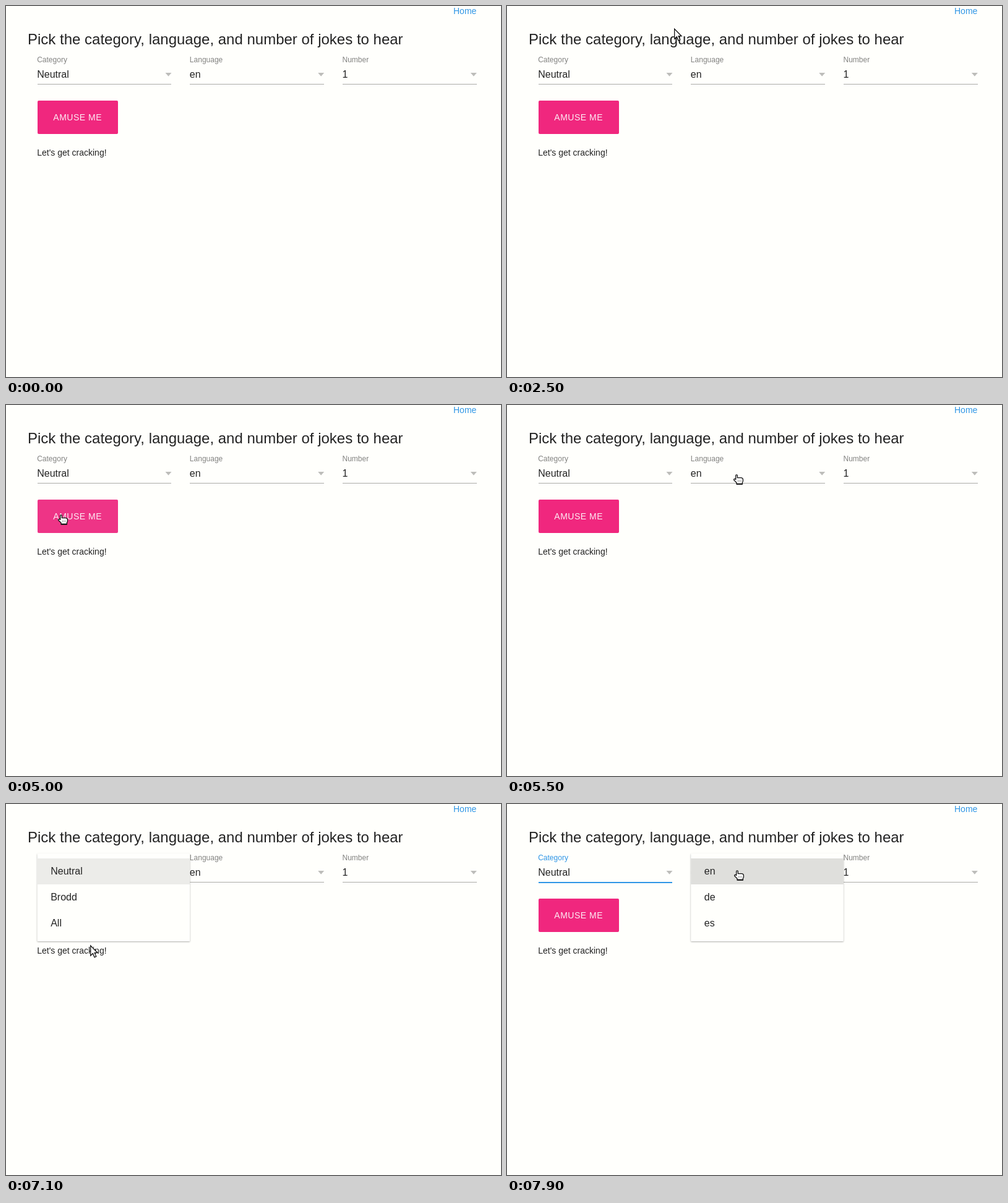
Recreate the animation shown at these times as an HTML page. Size 800 px wide and 600 px high, loop 8000 ms.

```html
<!DOCTYPE html>
<html lang="en">
<head>
<meta charset="utf-8">
<title>Joke picker</title>
<style>
  html, body { margin: 0; width: 100%; height: 100%; overflow: hidden; background: #fffffc; }
  svg { display: block; width: 800px; height: 600px; font-family: "Liberation Sans", Arial, sans-serif; }
  .box { filter: drop-shadow(0 1px 1.2px rgba(0, 0, 0, .32)); }
</style>
</head>
<body>
<svg id="stage" viewBox="0 0 800 600">
  <rect width="800" height="600" fill="#fffffc"/>
</svg>
<script>
const NS = 'http://www.w3.org/2000/svg';
const stage = document.getElementById('stage');
const LOOP = 8000, TICK = 100;
const INK = '#232323', GREY = '#838381', BLUE = '#2f96e6', LINE = '#ababa8';
const LEFT = 50.5, COLUMN = 246.67, FIELD = 216.67, ROW = 42;
const CATEGORY = { open: 5800, close: 7400 };
const LANGUAGE = { open: 7700, close: LOOP };

function set(node, attrs) {
  for (const key in attrs) node.setAttribute(key, attrs[key]);
}
function el(parent, tag, attrs, text) {
  const node = document.createElementNS(NS, tag);
  set(node, attrs);
  if (text) node.textContent = text;
  parent.appendChild(node);
  return node;
}
function label(parent, x, y, size, text, fill = INK) {
  return el(parent, 'text', { x, y, 'font-size': size, fill }, text);
}
const show = (node, on) => set(node, { visibility: on ? 'visible' : 'hidden' });
const columnX = i => LEFT + COLUMN * i;
const clamp = v => Math.max(0, Math.min(1, v));
const easeOut = (v, power) => 1 - Math.pow(1 - clamp(v), power);

function makeField(column, name, value) {
  const x = columnX(column), left = Math.round(x);
  const title = label(stage, x - .3, 91, 12, name, GREY);
  label(stage, x - .3, 116, 16, value);
  el(stage, 'path', { d: `M${x + 207} 108h10l-5 5.8z`, fill: '#bdbdba' });
  const line = el(stage, 'rect', { x: left, y: 126, width: Math.round(x + FIELD) - left });
  return focused => {
    set(title, { fill: focused ? BLUE : GREY });
    set(line, { fill: focused ? BLUE : LINE, height: focused ? 2 : 1 });
  };
}

function makeMenu(column, times, items) {
  const x = columnX(column);
  const group = el(stage, 'g', {});
  el(group, 'rect', { class: 'box', x, y: 80, width: COLUMN, height: 142, rx: 1, fill: '#fffffc' });
  const rows = items.map((text, i) => {
    const row = el(group, 'rect', { x, y: 88 + ROW * i, width: COLUMN, height: ROW });
    label(group, x + 21.7, 114 + ROW * i, 16, text);
    return row;
  });
  const rowFill = (i, hovered) => i === 0
    ? (hovered ? '#dfdfdc' : '#ecece9')
    : (hovered ? '#eeeeeb' : 'none');

  return (t, hover) => {
    const shown = t < times.close
      ? easeOut((t - times.open) / 150, 3)
      : 1 - easeOut((t - times.close) / 250, 3);
    show(group, shown > 0);
    set(group, {
      opacity: shown,
      transform: `translate(${x} 80) scale(${.3 + .7 * shown}) translate(${-x} -80)`
    });
    rows.forEach((row, i) => set(row, { fill: rowFill(i, hover === i) }));
  };
}

label(stage, 723, 13, 14, 'Home', BLUE);
label(stage, 35, 62, 24, 'Pick the category, language, and number of jokes to hear');
const focusCategory = makeField(0, 'Category', 'Neutral');
const focusLanguage = makeField(1, 'Language', 'en');
const focusNumber = makeField(2, 'Number', '1');
const button = el(stage, 'rect', { x: 51, y: 153, width: 130, height: 54, rx: 2 });
set(label(stage, 76.3, 185, 14, 'AMUSE ME', '#fdeef5'), { 'letter-spacing': .5 });
label(stage, LEFT - .3, 242, 14, "Let's get cracking!");
const drawCategory = makeMenu(0, CATEGORY, ['Neutral', 'Brodd', 'All']);
const drawLanguage = makeMenu(1, LANGUAGE, ['en', 'de', 'es']);

// Both cursors have their tip at the local origin.
const arrow = el(stage, 'path', {
  d: 'M.7 1V17.2L4.4 13.7L7 19.8L9.8 18.6L7.2 12.7H12z',
  fill: '#fff', stroke: '#111', 'stroke-width': 1.3
});
const hand = el(stage, 'g', {});
el(hand, 'path', {
  d: 'M-1.3 8.5V2.2Q-1.3.8 0 .8T1.3 2.2V5.6H7.6Q10.4 6 10.4 8.6V11.5L9.4 13V16H0V13.5L-4.2 9.6Q-4.8 7.6-3 7.3z',
  fill: '#fff', stroke: '#111', 'stroke-width': 1.3, 'stroke-linejoin': 'round'
});
el(hand, 'path', { d: 'M0 15.6H9.6', stroke: '#111', 'stroke-width': 1.8 });
el(hand, 'path', { d: 'M2.5 9.6v2.6M4.8 9.6v2.6M7.1 9.6v2.6', stroke: '#777', 'stroke-width': .8 });

// The tip follows one bent stroke per leg, slowing down towards its end.
const legs = [
  { show: 800, go: 800, arrive: 1200, hide: 1400, tick: 200, path: [[490, 201], [500, 319], [389, 268]] },
  { show: 2000, go: 2000, arrive: 2500, hide: 2600, path: [[290, 215], [-68, 370], [270, 36]] },
  { show: 4400, go: 4500, arrive: 5000, hide: 5000, path: [[524, 172], [300, 370], [89, 177]] },
  { show: 5000, go: 5000, arrive: 5400, hide: 5400, path: [[89, 177], [240, 75], [451, 104]] },
  { show: 5400, go: 5400, arrive: 6100, hide: 6600, path: [[451, 104], [300, 125], [150, 96]] },
  { show: 6600, go: 6600, arrive: 7100, hide: 7200, path: [[150, 96], [165, 160], [136, 228]] },
  { show: 7200, go: 7300, arrive: 7900, hide: LOOP, path: [[290, 210], [365, -30], [372, 107]] }
];

function tipAt(t) {
  const leg = legs.find(l => t >= l.show && t < l.hide);
  if (!leg) return null;
  const tick = leg.tick || TICK;
  const u = easeOut((Math.floor(t / tick) * tick - leg.go) / (leg.arrive - leg.go), 2);
  const [a, b, c] = leg.path;
  return [0, 1].map(k => Math.round((1 - u) ** 2 * a[k] + 2 * u * (1 - u) * b[k] + u * u * c[k]));
}

const inside = (tip, x, y, w, h) =>
  !!tip && tip[0] >= x && tip[0] < x + w && tip[1] >= y && tip[1] < y + h;

function draw(time) {
  const t = Math.floor(time / TICK) * TICK;
  const tip = tipAt(t);
  const isOpen = menu => t >= menu.open && t < menu.close;
  const openColumn = isOpen(CATEGORY) ? 0 : isOpen(LANGUAGE) ? 1 : -1;

  const onRows = openColumn >= 0 && inside(tip, columnX(openColumn), 88, COLUMN, 3 * ROW);
  const onButton = openColumn < 0 && inside(tip, 51, 153, 130, 54);
  const onField = openColumn < 0 && [0, 1, 2].some(i => inside(tip, columnX(i), 80, FIELD, 46));
  const pointing = onRows || onButton || onField;
  const hover = onRows ? Math.floor((tip[1] - 88) / ROW) : -1;

  set(button, { fill: onButton ? '#ee3486' : '#f0277e' });
  focusCategory(t >= CATEGORY.open);
  focusLanguage(t >= LANGUAGE.open);
  focusNumber(false);
  drawCategory(t, openColumn === 0 ? hover : -1);
  drawLanguage(t, openColumn === 1 ? hover : -1);

  show(arrow, tip && !pointing);
  show(hand, pointing);
  if (tip) set(pointing ? hand : arrow, { transform: `translate(${tip})` });
}

function loop() {
  draw(performance.now() % LOOP);
  requestAnimationFrame(loop);
}
loop();
</script>
</body>
</html>
```
